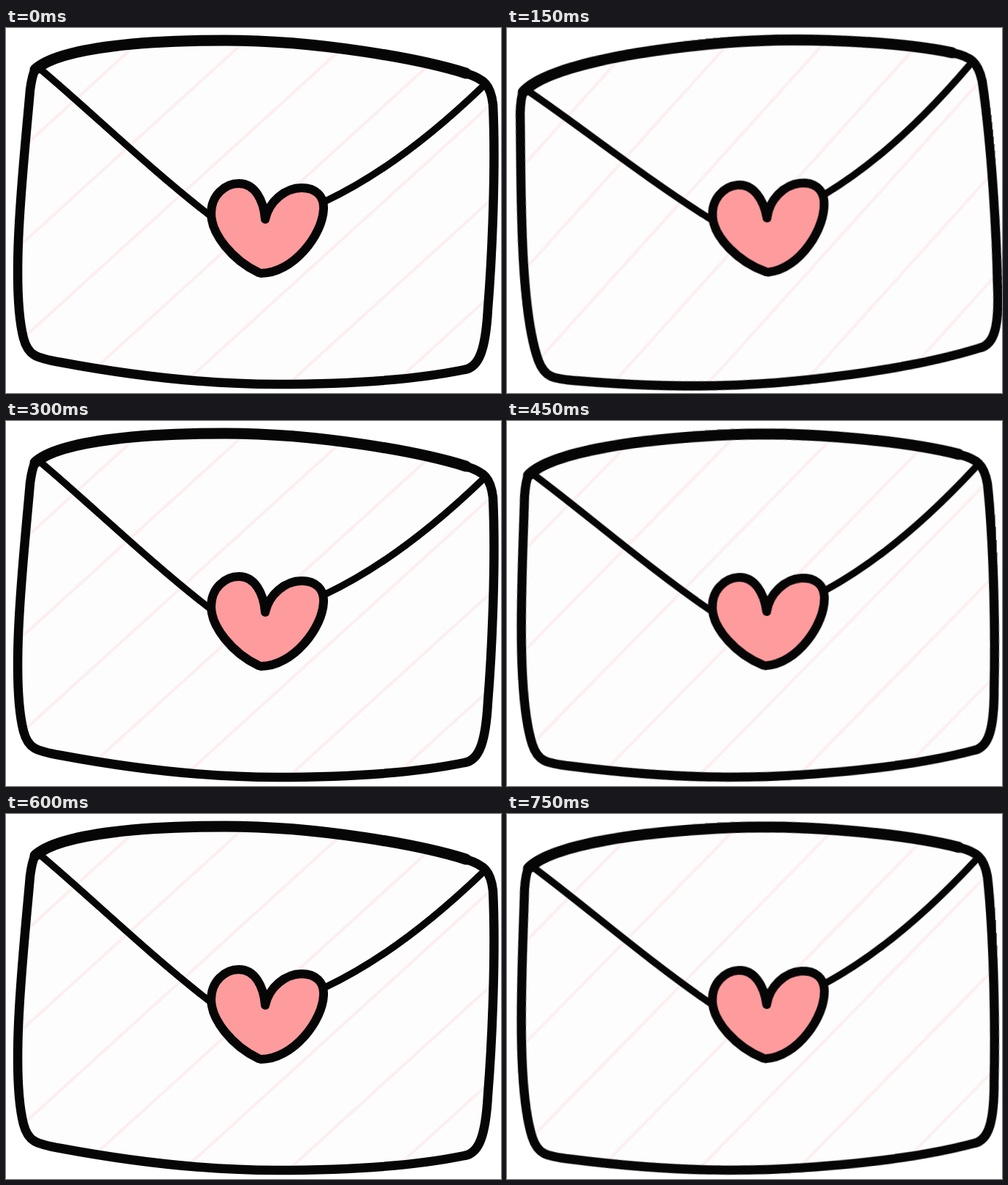
An HTML page for the animation above (900 ms loop, 678x500 px).

```html
<!DOCTYPE html>
<html lang="en">
<head>
<meta charset="utf-8">
<title>Love letter</title>
<style>
  html, body { margin: 0; width: 100%; height: 100%; overflow: hidden; background: #fff; }
  svg { display: block; width: 678px; height: 500px; }
  #letter { transform-box: view-box; transform-origin: 339px 250px; }
  .ink { fill: none; stroke: #060606; stroke-linecap: round; stroke-linejoin: round; }
</style>
</head>
<body>
<svg viewBox="0 0 678 500">
  <defs>
    <path id="top" d="M40 57C75 25 200 17 300 17C430 17 570 43 630 62"/>
    <path id="body" d="M40 57C75 25 200 17 300 17C430 17 570 43 630 62
      C655 70 664 78 667 105C671 190 666 310 660 385
      C657 440 648 465 628 468C550 484 450 488 370 488C260 488 150 472 75 458
      C40 452 30 448 24 425C5 350 25 180 33 85C35 70 37 62 40 57Z"/>
    <clipPath id="inside"><use href="#body"/></clipPath>
  </defs>
  <g id="letter">
    <use href="#body" fill="#fdfdfd"/>
    <path id="stripes" clip-path="url(#inside)" fill="none" stroke="#fdefef" stroke-width="4"/>
    <use href="#body" class="ink" stroke-width="12.5"/>
    <use href="#top" class="ink" stroke-width="15"/>
    <path class="ink" stroke-width="9.5"
      d="M49 58C110 109 198 194 277 255M438 237C510 203 580 150 651 82"/>
    <path class="ink" style="fill:#fd9b9d" stroke-width="12"
      d="M346 335C310 318 281 282 281 254C281 229 300 213 319 213C341 213 353 236 355 262
      C360 238 382 219 405 219C424 219 436 230 435 248C434 282 394 336 349 336"/>
  </g>
</svg>
<script>
const LOOP = 900;
const TILTS = [0, -5.73, 0, -3.29, 0, -3.29];

// Evenly spaced slanted stripes, clipped to the paper.
const stripes = Array.from({ length: 7 }, (_, i) => `M${203 + 144 * i} 0l-550 500`);
document.getElementById("stripes").setAttribute("d", stripes.join(""));

// The envelope rocks around its centre, holding each tilt.
const frames = [...TILTS, TILTS[0]].map((tilt, i) => ({
  transform: `rotate(${tilt}deg)`,
  offset: i / TILTS.length,
  easing: "steps(1, end)"
}));
document.getElementById("letter").animate(frames, { duration: LOOP, iterations: Infinity });
</script>
</body>
</html>
```
